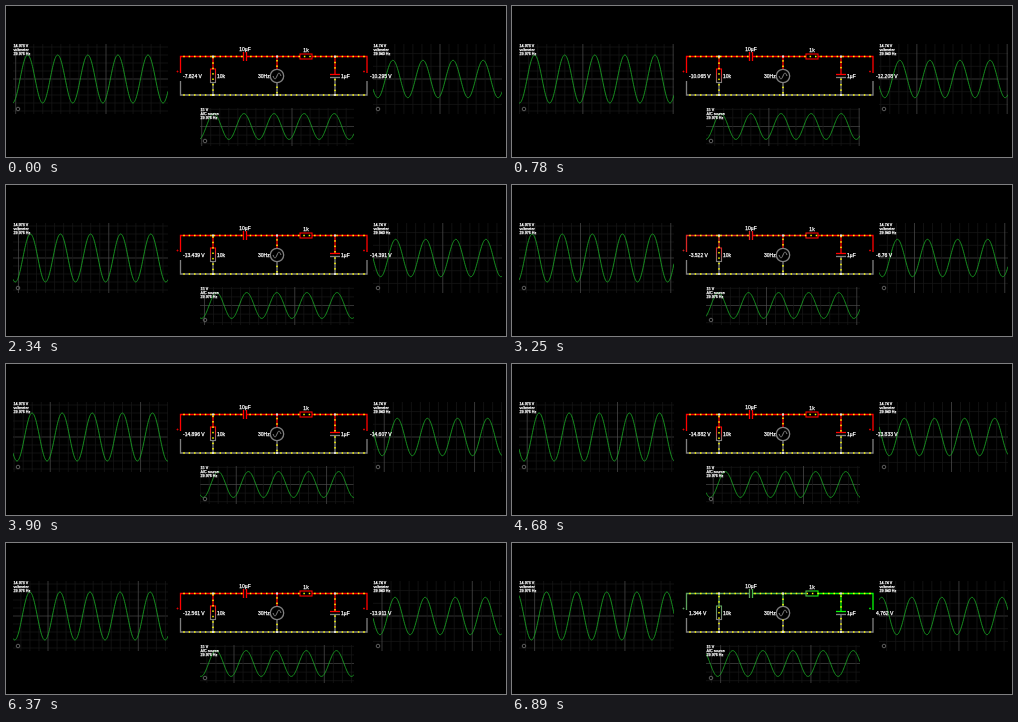
An HTML page with a canvas for the animation above (7.02 s loop, 500 by 151 pixels).

```html
<!DOCTYPE html>
<html lang="en">
<meta charset="utf-8">
<title>RC filters with scopes</title>
<style>
html, body { margin: 0; height: 100%; overflow: hidden; background: #000 }
canvas { display: block; width: 500px; height: 151px }
</style>
<canvas id="stage" width="500" height="151"></canvas>
<script>
const g = document.getElementById('stage').getContext('2d');
const STEP = 130, STEPS = 54, PERIOD = 30.1, RAD = Math.PI / 180;
const TOP = 50.5, BOTTOM = 89, GROUND = '#808080';
// [step, unwrapped phase in degrees] of the left meter
const PHASES = [[0, 239.4], [11, 878.1], [18, 1286.2], [25, 1696.4],
  [36, 2333.5], [44, 2803.2], [53, 3324.85]];

function phaseAt(step) {
  const i = Math.max(1, PHASES.findIndex(p => p[0] >= step));
  const [a, p] = PHASES[i - 1], [b, q] = PHASES[i];
  return p + (q - p) * (step - a) / (b - a);
}

function line(color, width, ...points) {
  g.strokeStyle = color;
  g.lineWidth = width;
  g.beginPath();
  for (let i = 0; i < points.length; i += 2) g.lineTo(points[i], points[i + 1]);
  g.stroke();
}

function text(s, x, y, size = 5, align = 'left') {
  g.font = `${size}px "Liberation Sans", Arial, sans-serif`;
  g.textAlign = align;
  g.textBaseline = 'middle';
  g.fillStyle = g.strokeStyle = '#fff';
  g.lineWidth = .25;
  g.fillText(s, x, y);
  g.strokeText(s, x, y);
}

function voltColor(v) {
  const k = Math.min(1, Math.abs(v) / 5);
  const on = 128 + 127 * k, off = 128 - 128 * k;
  return v < 0 ? `rgb(${on},${off},${off})` : `rgb(${off},${on},${off})`;
}

function volts(v) {
  return Math.abs(v) < 1 ? +(v * 1000).toFixed(3) + ' mV' : +v.toFixed(3) + ' V';
}

function scope({ x, y, w, h, mid, amp, grid, lag, labels }, phase) {
  const right = x + w;
  g.save();
  g.beginPath();
  g.rect(x, y, w, h);
  g.clip();
  for (let k = -5; k <= 5; k++)
    line(k ? '#191919' : '#484848', .7, x, mid + k * grid, right, mid + k * grid);
  const major = right - 62 - (phase - 239.4) / 360 * PERIOD;
  const gap = PERIOD * .3;
  const first = Math.ceil((x - major) / gap);
  for (let k = first; major + k * gap < right; k++) {
    const gx = major + k * gap;
    line(k % 10 ? '#191919' : '#505050', .7, gx, y, gx, y + h);
  }
  const points = [];
  for (let px = x; px <= right; px += .5) {
    const angle = (phase - lag) * RAD + (px - right) / PERIOD * 2 * Math.PI;
    points.push(px, mid - amp * Math.cos(angle));
  }
  line('#1cb028', .8, ...points);
  g.restore();
  g.strokeStyle = '#606060';
  g.lineWidth = 1;
  g.beginPath();
  g.arc(x + 5, y + h - 5, 1.8, 0, 7);
  g.stroke();
  labels.forEach((s, i) => text(s, x + .5, y + 2.2 + i * 4, 3.7));
}

const SCOPES = [
  { x: 7, y: 38, w: 155, h: 70, mid: 73, amp: 24, grid: 8, lag: 0,
    labels: ['14.978 V', 'voltmeter', '29.976 Hz'] },
  { x: 367, y: 38, w: 129, h: 70, mid: 73, amp: 18.7, grid: 12.7, lag: 13.7,
    labels: ['14.74 V', 'voltmeter', '29.940 Hz'] },
  { x: 194, y: 102, w: 154, h: 38, mid: 120.5, amp: 12.9, grid: 8.6, lag: 3,
    labels: ['15 V', 'A/C source', '29.976 Hz'] }
];

// Current dots along a straight wire
function dots(x1, y1, x2, y2, shift) {
  const len = Math.hypot(x2 - x1, y2 - y1), gap = 5.4;
  g.fillStyle = '#ff0';
  for (let d = ((shift % gap) + gap) % gap; d < len; d += gap)
    g.fillRect(x1 + (x2 - x1) * d / len - .75, y1 + (y2 - y1) * d / len - .75, 1.5, 1.5);
}

function resistor(x, y, w, h, from, to) {
  const fade = w > h ? g.createLinearGradient(x, 0, x + w, 0)
    : g.createLinearGradient(0, y, 0, y + h);
  fade.addColorStop(0, from);
  fade.addColorStop(1, to);
  g.strokeStyle = fade;
  g.lineWidth = 1.1;
  g.strokeRect(x, y, w, h);
}

function circuit(phase) {
  const wave = (amp, lag) => amp * Math.cos((phase - lag) * RAD);
  const vl = wave(14.978, 0), vs = wave(15, 3), vr = wave(14.74, 13.7);
  const [left, source, right] = [vl, vs, vr].map(voltColor);
  const W = 1.3;

  line(GROUND, W, 174.5, 75, 174.5, BOTTOM, 361, BOTTOM, 361, 75);
  line(GROUND, W, 207, 76.5, 207, BOTTOM);
  line(GROUND, W, 271, 77, 271, BOTTOM);
  line(GROUND, W, 329, 71.5, 329, BOTTOM);
  line(left, W, 174.5, 67, 174.5, TOP, 237.5, TOP);
  line(left, W, 207, TOP, 207, 63);
  line(source, W, 240.5, TOP, 294, TOP);
  line(source, W, 271, TOP, 271, 63);
  line(right, W, 306, TOP, 361, TOP, 361, 67);
  line(right, W, 329, TOP, 329, 68.5);

  resistor(204.5, 63, 5, 13.5, left, GROUND);
  resistor(294, 48, 12, 5, source, right);
  line(left, W, 237.5, 46, 237.5, 55);
  line(source, W, 240.5, 46, 240.5, 55);
  line(right, W, 324, 68.5, 334, 68.5);
  line(GROUND, W, 324, 71.5, 334, 71.5);

  g.strokeStyle = GROUND;
  g.beginPath();
  g.arc(271, 70, 6.7, 0, 7);
  g.stroke();
  const sine = [];
  for (let d = -4; d <= 4; d += .5) sine.push(271 + d, 70 - 3 * Math.sin(d * Math.PI / 4));
  line(GROUND, 1, ...sine);

  const a = Math.sin(phase * RAD), b = 2 * Math.cos((phase - 13.7) * RAD);
  for (const y of [TOP, BOTTOM]) {
    dots(176, y, 207, y, 2);
    dots(329, y, 360, y, 2);
  }
  dots(207, TOP, 237, TOP, 1 - a);
  dots(241, TOP, 271, TOP, 3 - a);
  dots(271, TOP, 329, TOP, 2 + b);
  dots(207, TOP, 207, BOTTOM, 2 + a);
  dots(207, BOTTOM, 271, BOTTOM, 2 + a);
  dots(271, BOTTOM, 329, BOTTOM, 2 - b);
  dots(329, TOP, 329, 67, 2 + b);
  dots(329, 73, 329, BOTTOM, 2 + b);
  dots(271, TOP, 271, 63, 2 - a - b);
  dots(271, 77, 271, BOTTOM, 2 - a - b);

  g.fillStyle = '#ddd';
  for (const x of [207, 271, 329])
    for (const y of [TOP, BOTTOM]) g.fillRect(x - 1, y - 1, 2, 2);

  for (const [x, color] of [[171.5, left], [358, right]]) {
    line(color, .7, x - 1, 65.5, x + 1, 65.5);
    line(color, .7, x, 64.5, x, 66.5);
  }
  text('10µF', 239, 43.5, 5, 'center');
  text('1k', 300, 44.5, 5, 'center');
  text('10k', 211, 70.5);
  text('30Hz', 252, 70.5);
  text('1µF', 335, 70.5);
  text(volts(vl), 177, 70.5);
  text(volts(vr), 364, 70.5);
}

function draw() {
  const phase = phaseAt(Math.floor(performance.now() / STEP) % STEPS);
  g.fillStyle = '#000';
  g.fillRect(0, 0, 500, 151);
  for (const s of SCOPES) scope(s, phase);
  circuit(phase);
  requestAnimationFrame(draw);
}
draw();
</script>
</html>
```
